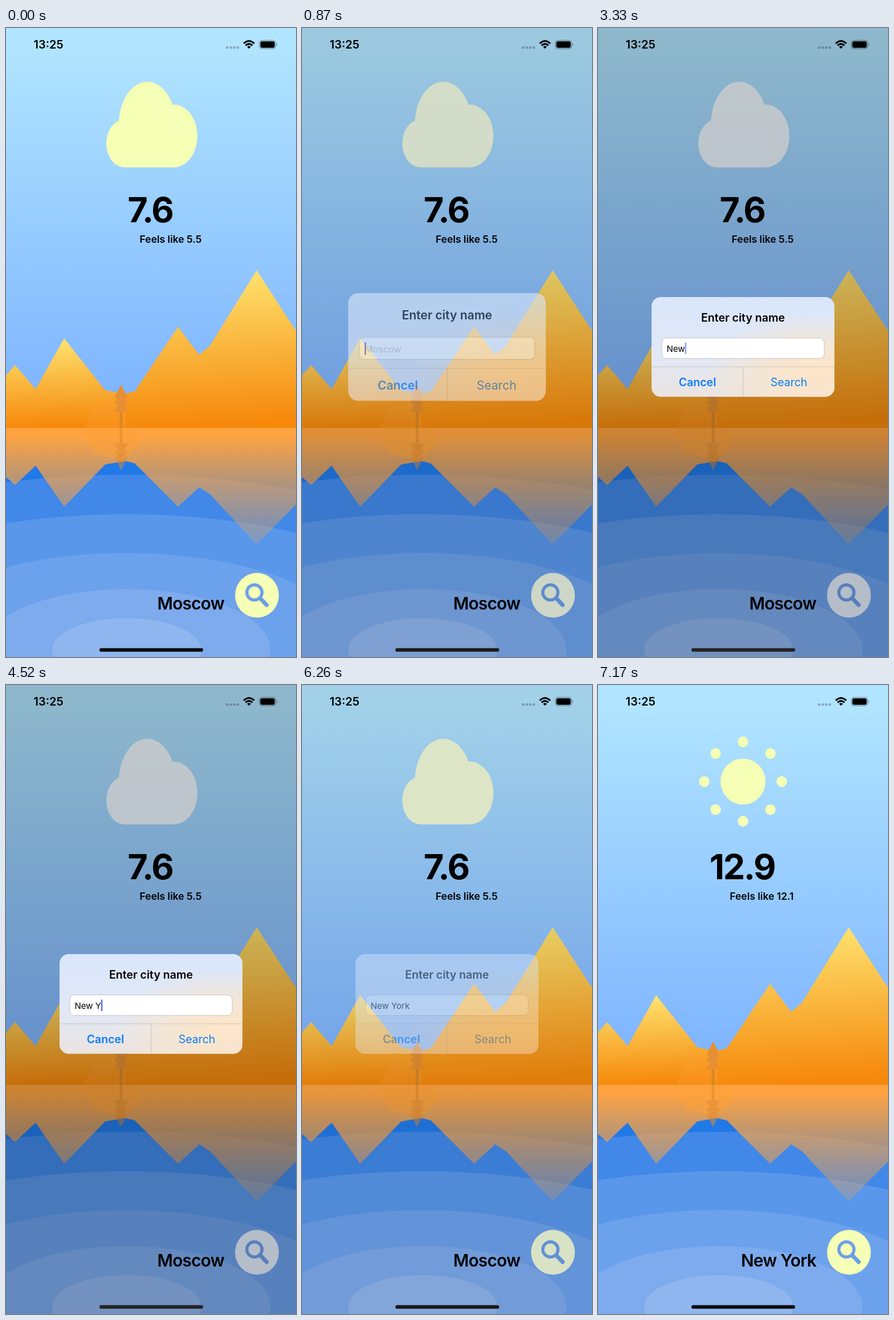
An HTML page for the animation above (8000 ms loop, 509 px wide and 1101 px high).

```html
<!DOCTYPE html>
<html lang="en">
<head>
<meta charset="utf-8">
<title>Weather</title>
<style>
  html, body { margin: 0; width: 100%; height: 100%; overflow: hidden; }
  svg { display: block; width: 509px; height: 1101px; font-family: Inter, "Open Sans", sans-serif; }
  .bold { font-weight: 700; }
  .semi { font-weight: 600; }
  .mid { text-anchor: middle; }
  .end { text-anchor: end; }
</style>
</head>
<body>
<svg viewBox="0 0 509 1101">
  <defs>
    <linearGradient id="sky" x2="0" y2="1">
      <stop offset=".04" stop-color="#b1e5ff"/><stop offset="1" stop-color="#7ab0ff"/>
    </linearGradient>
    <linearGradient id="rock" x2=".06" y2="1">
      <stop stop-color="#fee673"/><stop offset="1" stop-color="#f6890c"/>
    </linearGradient>
    <linearGradient id="mirror" gradientUnits="userSpaceOnUse" x1="0" y1="700" x2="0" y2="905">
      <stop offset=".06" stop-color="#ffa340"/><stop offset="1" stop-color="#ffa340" stop-opacity=".2"/>
    </linearGradient>
    <linearGradient id="glass" x2="0" y2="1">
      <stop stop-color="#d9e7fc"/><stop offset=".6" stop-color="#e2e8f5"/><stop offset="1" stop-color="#ebe4e0"/>
    </linearGradient>
    <radialGradient id="glow" cx=".9" cy=".75" r=".6">
      <stop stop-color="#fde5c8"/><stop offset=".4" stop-color="#fde5c8" stop-opacity=".75"/>
      <stop offset="1" stop-color="#fde5c8" stop-opacity="0"/>
    </radialGradient>
    <g id="tree">
      <path d="M202 624l12 24h-24zM202 637l12 21h-24zM202 648l12 24h-24z"/>
      <path d="M199.5 672h5v28h-5z" fill="#d98728"/>
    </g>
  </defs>

  <rect width="509" height="701" fill="url(#sky)"/>
  <rect y="700" width="509" height="401" fill="#2179e8"/>
  <g id="rings"></g>

  <path fill="url(#rock)" d="M0 608L16 590 52 632 102 543 174 634 209 641 214 700H0z"/>
  <path fill="url(#rock)" d="M205 641L226 636 302 523 339 572 358 556 440 424 507 527 509 528V700H205z"/>
  <path fill="url(#mirror)" d="M0 700H509V834L440 904 358 816 339 804 302 838 226 762 209 758 174 764 102 838 52 766 16 800 0 786z"/>
  <path fill="#fba038" opacity=".3" d="M155 662L135 703V700H209V650z"/>
  <path fill="#ffa136" opacity=".5" d="M135 701V708L155 745 207 757 240 725 225 701z"/>
  <use href="#tree" fill="#e68f33"/>
  <use href="#tree" fill="#e08a30" opacity=".5" transform="matrix(1 0 0 -.97 0 1379)"/>

  <g id="cloud" class="tint">
    <ellipse cx="248" cy="169" rx="50" ry="75"/>
    <ellipse cx="208" cy="202" rx="32" ry="42"/>
    <ellipse cx="294" cy="189" rx="42" ry="55"/>
    <path d="M208 165H294V244H208z"/>
  </g>
  <g id="sun" class="tint"></g>
  <ellipse class="tint" cx="440.5" cy="993" rx="38.5" ry="39.3"/>
  <g fill="none" stroke="#6a9fea" stroke-linecap="round">
    <circle cx="436" cy="988" r="13.3" stroke-width="5.4"/>
    <path d="M447 999L457.500 1010" stroke-width="7"/>
  </g>

  <rect id="dim" width="509" height="1101"/>

  <text id="temp" class="bold mid" x="253" y="340" font-size="61" letter-spacing="-2.4"></text>
  <text id="feels" class="semi end" x="343.500" y="376" font-size="17.500"></text>
  <text id="city" class="semi end" x="383" y="1018" font-size="29.800" letter-spacing="-.75"></text>

  <text class="semi" x="48.500" y="36" font-size="20">13:25</text>
  <g opacity=".25">
    <circle cx="388" cy="34.200" r="2.300"/><circle cx="394.400" cy="34.200" r="2.300"/>
    <circle cx="400.800" cy="34.200" r="2.300"/><circle cx="407" cy="34.200" r="2.300"/>
  </g>
  <g fill="none" stroke="#000" stroke-width="3">
    <path d="M417.200 27.200Q426.500 18.300 435.800 27.200M420.500 30.700Q426.500 25 432.500 30.700"/>
    <path d="M426.500 36.300l-3.300-3.400q3.300-2.600 6.600 0z" fill="#000" stroke="none"/>
  </g>
  <rect x="444.500" y="21.500" width="29" height="15" rx="4.500" fill="none" stroke="#000" stroke-opacity=".4"/>
  <rect x="446.300" y="23.300" width="25.400" height="11.400" rx="3"/>
  <path d="M475 26.500q2 2.500 0 5z" opacity=".5"/>

  <g id="alert">
    <rect x="94" y="471" width="321" height="174.500" rx="16" fill="url(#glass)"/>
    <rect x="94" y="471" width="321" height="174.500" rx="16" fill="url(#glow)"/>
    <text class="semi mid" x="254.500" y="514" font-size="19.500">Enter city name</text>
    <rect x="112" y="542.500" width="285" height="36" rx="8" fill="#fff" stroke="#3c3c43" stroke-opacity=".25"/>
    <path d="M94 593H415M254.500 593V645" stroke="#3c3c43" stroke-opacity=".2"/>
    <text id="field" x="120.500" y="567" font-size="15" xml:space="preserve"></text>
    <rect id="caret" y="550.500" width="2.200" height="20.500" rx="1" fill="#4264f0"/>
    <g class="mid" fill="#0a7cfa" font-size="19.500">
      <text class="semi mid" x="174.500" y="627">Cancel</text>
      <text x="335" y="627">Search</text>
    </g>
  </g>
  <rect id="home" x="164" y="1085.500" width="182" height="6.300" rx="3.100"/>
</svg>
<script>
const LOOP = 8000, STEP = 91.4, OFFSET = 500;
const OPEN = 777, CLOSE = 6176, UPDATE = 7075, BLINK = 1320;
const WORD = 'New York';
const KEYS = [2415, 2600, 2785, 4065, 4515, 4695, 4885, 5705];

const $ = id => document.getElementById(id);
const clamp = v => Math.max(0, Math.min(1, v));
const mix = (a, b, k) => a + (b - a) * k;

const ring = (rx, ry, color) => `<ellipse cx="212" cy="1088" rx="${rx}" ry="${ry}" fill="${color}"/>`;
$('rings').innerHTML = ring(735, 306, '#4188e8') + ring(587, 237, '#5997ea') +
  ring(405, 169, '#6ca1ec') + ring(252, 106, '#7dabed') + ring(131, 55, '#8fb6ef');

let sun = '<ellipse cx="254.5" cy="169" rx="39.5" ry="40.2"/>';
for (let i = 0; i < 8; i++) {
  const a = i * Math.PI / 4;
  sun += `<ellipse cx="${254.5 + 68 * Math.cos(a)}" cy="${169 + 69.5 * Math.sin(a)}" rx="9.2" ry="9.4"/>`;
}
$('sun').innerHTML = sun;
const tinted = document.querySelectorAll('.tint');

// Critically damped spring from 0 to 1
function spring(ms) {
  const x = Math.max(0, ms) * .0228;
  return 1 - (1 + x) * Math.exp(-x);
}

function caretAlpha(t, lastKey) {
  if (t >= CLOSE) return 0;
  if (t < BLINK - 5 || t - lastKey < 440) return 1;
  const phase = (t - BLINK + 5) % 1005;
  return clamp(Math.max(.7 - phase / 280, (phase - 325) / 225));
}

function draw(time) {
  // The screen refreshes about eleven times a second
  const t = OFFSET + Math.floor((time - OFFSET + 5) / STEP) * STEP;
  const shown = t < CLOSE ? spring(t - OPEN) : 1 - spring(t - CLOSE);
  const updated = t >= UPDATE;

  $('dim').setAttribute('opacity', shown * .2);
  const tint = `rgb(${mix(245, 255, shown)},255,${mix(181, 255, shown)})`;
  for (const el of tinted) {
    el.setAttribute('fill', tint);
    el.setAttribute('opacity', 1 - .2 * shown);
  }
  const gray = mix(12, 36, shown);
  $('home').setAttribute('fill', `rgb(${gray},${gray},${gray})`);

  $('cloud').style.display = updated ? 'none' : '';
  $('sun').style.display = updated ? '' : 'none';
  $('temp').textContent = updated ? '12.9' : '7.6';
  $('feels').textContent = 'Feels like ' + (updated ? '12.1' : '5.5');
  $('city').textContent = updated ? WORD : 'Moscow';

  const typed = KEYS.filter(k => k <= t).length;
  const field = $('field');
  field.textContent = WORD.slice(0, typed) || 'Moscow';
  field.setAttribute('fill', typed ? '#000' : '#c4c4c6');
  const width = typed ? field.getComputedTextLength() : 0;
  $('caret').setAttribute('x', 120.6 + width);
  $('caret').setAttribute('opacity', caretAlpha(t, typed ? KEYS[typed - 1] : -LOOP));

  const scale = t < CLOSE ? 1.2 - .2 * shown : 1;
  $('alert').setAttribute('opacity', shown);
  $('alert').setAttribute('transform', `translate(254.5 558) scale(${scale}) translate(-254.5 -558)`);
}

const start = performance.now();
(function tick() {
  draw((performance.now() - start) % LOOP);
  requestAnimationFrame(tick);
})();
</script>
</body>
</html>
```
